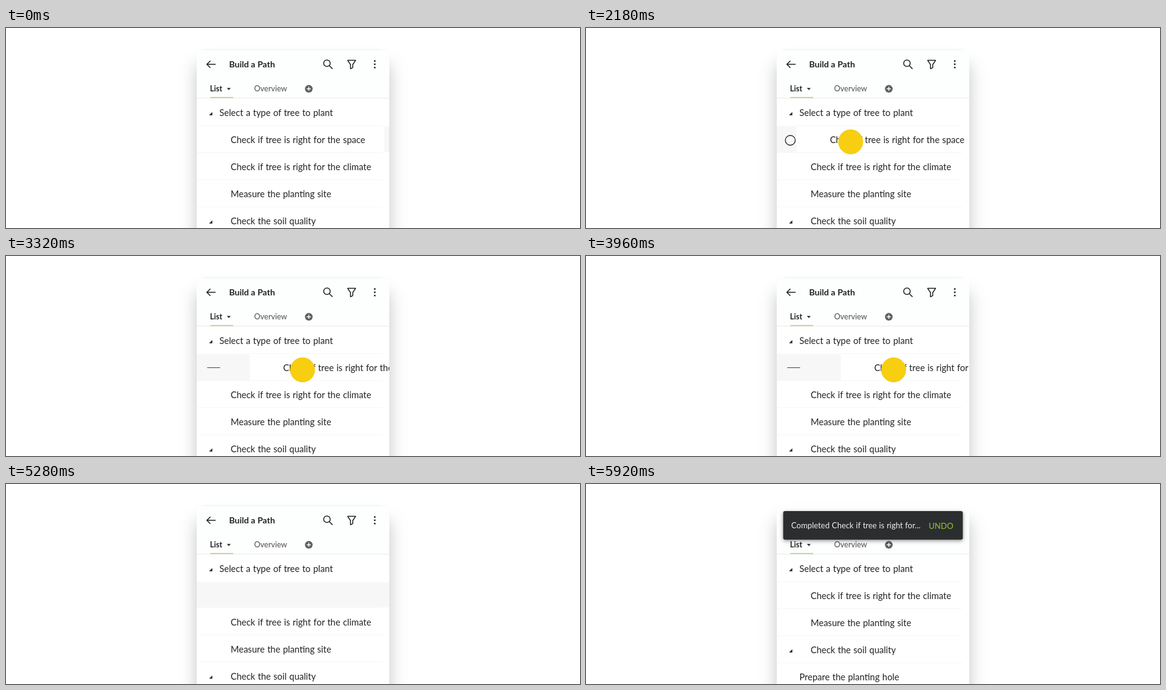
Recreate the animation shown at these times as an HTML page. Size 930 px wide and 325 px high, loop 8000 ms.

```html
<!DOCTYPE html>
<html lang="en">
<head>
<meta charset="utf-8">
<title>Swipe to complete</title>
<style>
  html, body { margin: 0; width: 100%; height: 100%; overflow: hidden; background: #fff; }
  svg { display: block; width: 930px; height: 325px; }
  text { font: 14.5px Lato, sans-serif; word-spacing: .6px; fill: #222; }
  .title { font-size: 14px; font-weight: 700; word-spacing: 0; }
  .tab { font-size: 12.5px; font-weight: 500; fill: #5c5c5c; }
  .tab.active { font-weight: 700; fill: #222; }
  .toast text { font-size: 12.9px; word-spacing: .4px; fill: #eee; }
  .toast .undo { font-size: 13.1px; font-weight: 500; fill: #86b83c; }
  .line { fill: none; stroke: #222; stroke-width: 1.5; }
  .divider { stroke: #f7f7f7; }
  .shadow { filter: blur(14px); }
  .toast rect { filter: drop-shadow(0 2px 3px rgba(0, 0, 0, .4)); }
</style>
</head>
<body>
<svg viewBox="0 0 930 325">
  <defs>
    <clipPath id="panel"><rect x="309" y="34" width="312" height="291"/></clipPath>
    <path id="expander" d="M329 141.7L334.3 136.6V141.7Z" fill="#222"/>
  </defs>
  <rect class="shadow" x="309" y="60" width="312" height="400" fill="#000" fill-opacity=".23"/>
  <g clip-path="url(#panel)">
    <rect x="309" y="34" width="312" height="291" fill="#fff"/>
    <rect x="309" y="34" width="312" height="80" fill="#fdfefe"/>

    <g class="line">
      <path d="M339.6 59H325.6M331.2 53.2L325.4 59L331.2 64.8"/>
      <circle cx="520" cy="57.3" r="5.3"/>
      <path d="M523.9 61.2L529 66.4"/>
      <path d="M553.6 52.6H566.4L561.8 59.5V64.3L558.2 66.3V59.5Z" stroke-linejoin="round"/>
    </g>
    <g fill="#222">
      <circle cx="597.5" cy="53.7" r="1.4"/>
      <circle cx="597.5" cy="59" r="1.4"/>
      <circle cx="597.5" cy="64.3" r="1.4"/>
      <path d="M357.8 97.5H364.2L361 100.8Z"/>
    </g>
    <text class="title" x="361.5" y="63.5">Build a Path</text>
    <text class="tab active" x="330.5" y="103">List</text>
    <text class="tab" x="402" y="103">Overview</text>
    <circle cx="490.6" cy="98.8" r="6.2" fill="#5f6062"/>
    <path d="M487.4 98.8h6.4M490.6 95.6v6.4" stroke="#fff" stroke-width="1.4"/>
    <path d="M309 113.9H621" stroke="#e8e8e8"/>
    <path d="M331 113H368" stroke="#aed56c" stroke-width="1.6"/>

    <use href="#expander"/>
    <text x="345.7" y="143">Select a type of tree to plant</text>
    <path class="divider" d="M309 158.5H610"/>

    <rect x="309" y="160" width="312" height="42" fill="#f7f7f7"/>
    <circle id="openIcon" class="line" cx="331" cy="182.5" r="8" style="stroke-width:1.3"/>
    <path id="dashIcon" d="M326 181.5H347" stroke="#444"/>
    <g id="row">
      <rect x="310" y="160" width="303" height="42" fill="#fff"/>
      <text x="364" y="187">Check if tree is right for the space</text>
    </g>

    <g id="rest">
      <rect x="309" y="202" width="312" height="200" fill="#fff"/>
      <path class="divider" d="M309 202.5H610M309 246.5H610M309 290.5H610M309 334.5H610"/>
      <text x="364" y="231">Check if tree is right for the climate</text>
      <text x="364" y="275">Measure the planting site</text>
      <text x="364" y="319">Check the soil quality</text>
      <use href="#expander" y="176"/>
      <text x="345.7" y="363">Prepare the planting hole</text>
    </g>

    <circle id="finger" cx="395.5" cy="185" r="19.7" fill="#f8ce10" stroke="#f5c90e"/>

    <g id="toast" class="toast">
      <rect x="319.5" y="44" width="291" height="46.5" rx="3" fill="#2b2d2e"/>
      <text x="332.6" y="72">Completed Check if tree is right for...</text>
      <text class="undo" x="555.2" y="72.5">UNDO</text>
    </g>
  </g>
</svg>
<script>
  const LOOP = 8000;
  const DASH_THRESHOLD = 76;
  const [openIcon, dashIcon, row, rest, finger, toast] =
    ["openIcon", "dashIcon", "row", "rest", "finger", "toast"].map(id => document.getElementById(id));

  const linear = u => u;
  const easeInOut = u => u < .5 ? 2 * u * u : 1 - 2 * (1 - u) ** 2;

  // Value at time t along [time, value] keys, held before the first and after the last.
  function track(t, keys, ease = easeInOut) {
    const next = keys.findIndex(([time]) => t < time);
    if (next === 0) return keys[0][1];
    if (next < 0) return keys[keys.length - 1][1];
    const [t0, v0] = keys[next - 1], [t1, v1] = keys[next];
    return v0 + (v1 - v0) * ease((t - t0) / (t1 - t0));
  }

  const drag = [[2970, 48], [3560, 103], [3950, 103], [4300, 58]];
  const fingerX = [[1810, 0], [2420, 48], ...drag];
  const rowX = [[1810, 0], [2420, 45], [2450, 45], [2600, 48], ...drag, [4670, 58], [5254, 312]];
  const fingerOpacity = [[850, 0], [950, 1], [4670, 1], [4770, 0]];
  const fingerFill = [[1620, .63], [1720, 1]];
  const restY = [[5240, 0], [5560, -44]];
  const toastY = [[5450, -62], [5920, 0]];

  const move = (node, x, y) => node.setAttribute("transform", `translate(${x} ${y})`);
  const show = (node, visible) => node.setAttribute("visibility", visible ? "visible" : "hidden");

  function draw() {
    const t = performance.now() % LOOP;
    const offset = track(t, rowX);
    const dashed = offset > DASH_THRESHOLD && t < 4400;
    move(row, offset, 0);
    move(finger, track(t, fingerX), 0);
    move(rest, 0, track(t, restY));
    move(toast, 0, track(t, toastY));
    finger.setAttribute("opacity", track(t, fingerOpacity, linear));
    finger.setAttribute("fill-opacity", track(t, fingerFill, linear));
    show(dashIcon, dashed);
    show(openIcon, !dashed && t < 5270);
    requestAnimationFrame(draw);
  }
  draw();
</script>
</body>
</html>
```
